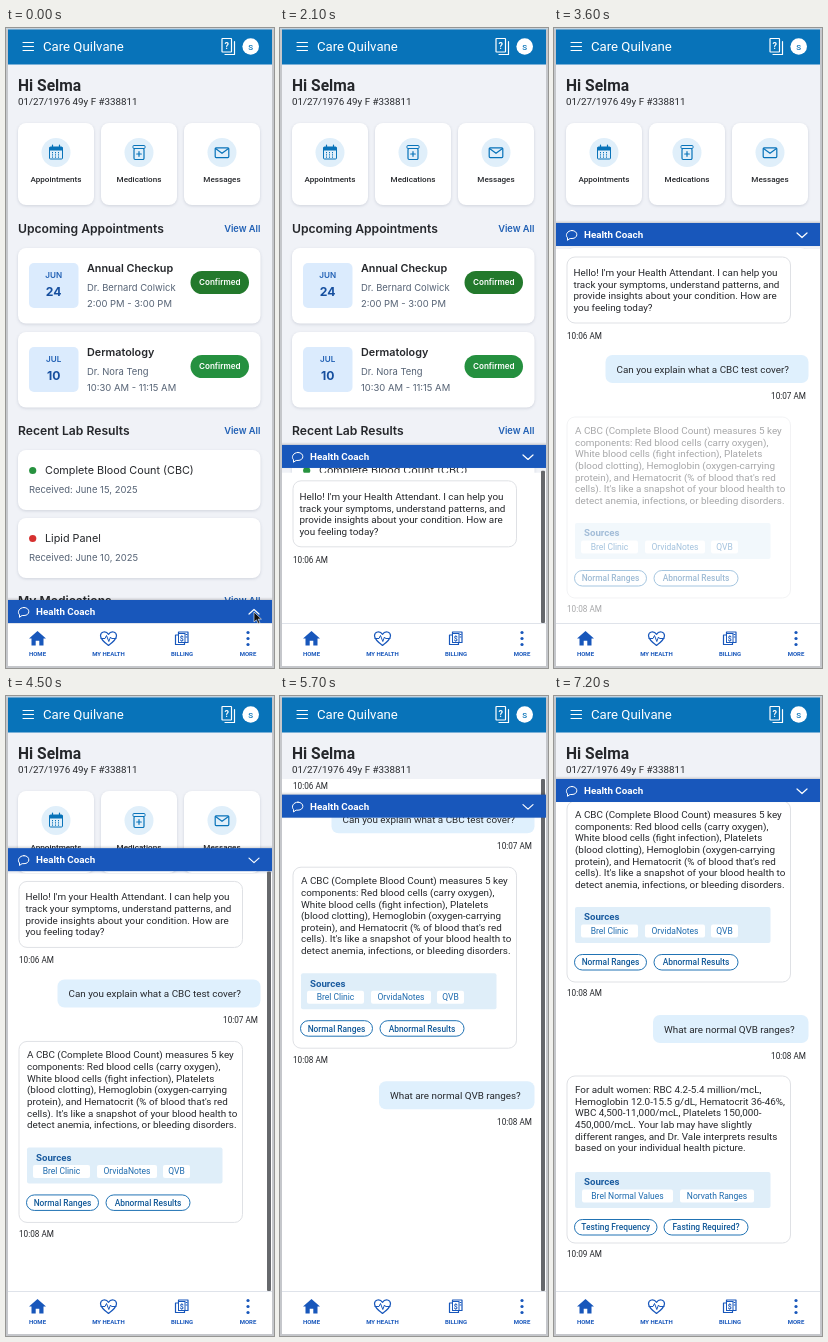
Write an HTML page that moves like this. It is 268 px wide and 640 px high and loops after 7300 ms.

```html
<!DOCTYPE html>
<html lang="en">
<head>
<meta charset="utf-8">
<title>Health chat</title>
<style>
html, body { margin: 0; width: 100%; height: 100%; overflow: hidden; background: #f0f2f7; }
svg { display: block; }
text { font-family: Roboto, sans-serif; fill: #25272b; white-space: pre; }
.inter { font-family: Inter, sans-serif; }
.card { fill: #fff; filter: drop-shadow(0 1px 1.5px #1b2a4a26); }
.line { fill: none; stroke-linecap: round; stroke-linejoin: round; }
</style>
</head>
<body>
<svg id="stage" width="268" height="640" viewBox="0 0 268 640"></svg>
<script>
const BLUE = '#1857bb', SKY = '#0873b9', LINK = '#1f5fb4', GREY = '#566375';

const rect = (x, y, w, h, fill, r = 0, extra = '') =>
  `<rect x="${x}" y="${y}" width="${w}" height="${h}" rx="${r}" fill="${fill}" ${extra}/>`;
const circle = (x, y, r, fill, extra = '') => `<circle cx="${x}" cy="${y}" r="${r}" fill="${fill}" ${extra}/>`;
const line = (d, color, width = 1, extra = '') =>
  `<path class="line" d="${d}" stroke="${color}" stroke-width="${width}" ${extra}/>`;
// y is the vertical middle of the capitals
const text = (x, y, str, size, { color = '#25272b', weight = 400, anchor = 'start', cls = '' } = {}) =>
  `<text x="${x}" y="${y + size * .36}" font-size="${size}" font-weight="${weight}" text-anchor="${anchor}" class="${cls}" style="fill:${color}">${str}</text>`;
const inter = (x, y, str, size, opts) => text(x, y, str, size, { cls: 'inter', ...opts });
const at = (x, y, body, id = '') => `<g ${id && `id="${id}"`} transform="translate(${x} ${y})">${body}</g>`;
const card = (x, y, w, h) => rect(x, y, w, h, '#fff', 8, 'class="card"');

const icons = {
  calendar: rect(-6.5, -5.5, 13, 12, 'none', 1, `stroke="${SKY}"`) + rect(-6.5, -5.5, 13, 3.5, SKY) +
    line('M-3.5-7.5v2M3.5-7.5v2', SKY, 1.2) +
    line('M-4 .2H5M-4 2.4H5M-4 4.6H5', SKY, 1.3, 'stroke-dasharray="1 2" style="stroke-linecap:butt"'),
  bottle: rect(-6, -7, 12, 3, 'none', .8, `stroke="${SKY}"`) + rect(-5, -4, 10, 11, 'none', 1.2, `stroke="${SKY}" stroke-width="1.2"`) +
    line('M-2.3 1.5h4.6M0-.8v4.6', SKY, 1.2),
  mail: rect(-6.8, -4.7, 13.6, 9.8, 'none', 1, `stroke="${SKY}" stroke-width="1.2"`) + line('M-6.5-4L0 .8L6.5-4', SKY, 1.2),
  home: `<path d="M0-7.5L8.5 0H6v7H1.8V2.3h-3.6V7H-6V0h-2.5Z" fill="${BLUE}"/>`,
  heart: line('M0 7C-5 3-8 .5-8-2.8C-8-7-2.5-8 0-4.2C2.5-8 8-7 8-2.8C8 .5 5 3 0 7Z', BLUE, 1.2) +
    line('M-7.5 0h4l1.5-3L.3 3L2-1.5L3 0h4.5', BLUE, 1),
  bill: line('M-3.5-3.5v-3h9.5v10.500h-3M-3.500-3.500h-3v9.500h9v-3', BLUE, 1.2) +
    rect(-3.5, -5, 6.5, 9, '#fff', 0, `stroke="${BLUE}"`) +
    text(-.2, -.5, '$', 7, { color: BLUE, weight: 700, anchor: 'middle' }) + line('M4-4h1M4-1.500h1', BLUE),
  dots: [-6, 0, 6].map(y => circle(0, y, 1.6, BLUE)).join(''),
};

function heading(y, title) {
  return inter(12, y, title, 12.15, { weight: 600 }) +
    inter(254.5, y, 'View All', 9.3, { color: LINK, weight: 600, anchor: 'end' });
}
function shortcut(x, w, icon, label) {
  const mid = x + w / 2;
  return card(x, 95, w, 82) + circle(mid, 124.500, 14.5, '#e0effa') + at(mid, 124.5, icons[icon]) +
    text(mid, 151, label, 8.1, { weight: 500, anchor: 'middle' });
}
function appointment(y, month, day, title, doctor, time, green) {
  return card(12, y, 242.500, 75.5) + rect(23, y + 15, 49.5, 45, '#dbebfd', 5) +
    inter(47.7, y + 27, month, 8.1, { color: LINK, weight: 600, anchor: 'middle' }) +
    inter(47.7, y + 44, day, 12.15, { color: '#164f9f', weight: 700, anchor: 'middle' }) +
    inter(81, y + 20, title, 10.8, { weight: 600 }) +
    inter(81, y + 40, doctor, 9.45, { color: GREY }) + inter(81, y + 55.5, time, 9.45, { color: GREY }) +
    rect(184.5, y + 23, 58.500, 23, green, 11.5) +
    inter(213.8, y + 34.5, 'Confirmed', 8.1, { color: '#fff', weight: 600, anchor: 'middle' });
}
function labResult(y, color, title, date) {
  return card(12, y, 242.5, 60) + circle(26.7, y + 20.5, 3.6, color) +
    inter(39, y + 20, title, 10.8) + inter(23, y + 40, 'Received: ' + date, 9.45, { color: GREY });
}

const paragraph = (x, y, lines) => lines.map((s, i) => text(x, y + i * 11.65, s, 9.87)).join('');
const stamp = (x, y, time, anchor) => text(x, y, time, 8.2, { anchor });
const bubble = (y, h) => rect(13, y, 223.5, h, '#fff', 8, 'stroke="#dfe1e5"');

function question(id, y, x, str, time) {
  return `<g id="${id}">` + rect(x, y, 254.5 - x, 28, '#dff0fd', 7) + text(x + 11, y + 14, str, 9.87) +
    stamp(252, y + 41, time, 'end') + '</g>';
}
// chips and buttons are [left, width, label]
function answer(id, y, h, lines, sourcesY, chips, buttons, time) {
  const top = y + sourcesY;
  return `<g id="${id}">` + bubble(y, h) + paragraph(21, y + 13.5, lines) +
    rect(21, top, 195.5, 36, '#dfeef9', 2) + text(30, top + 10, 'Sources', 9.7, { color: '#1a5b9f', weight: 600 }) +
    chips.map(([x, w, s]) => rect(x, top + 17.5, w, 13, '#fff', 2) +
      text(x + w / 2, top + 24, s, 8.5, { color: '#1c6aae', anchor: 'middle' })).join('') +
    buttons.map(([x, w, s]) => rect(x, top + 47.5, w, 15.5, '#fff', 7.8, 'stroke="#2173b4"') +
      text(x + w / 2, top + 55.3, s, 8.4, { color: '#135a99', weight: 500, anchor: 'middle' })).join('') +
    stamp(13, y + h + 11.5, time) + '</g>';
}

const page = rect(0, 0, 268, 640, '#f0f2f7') +
  text(12, 57.5, 'Hi Selma', 15.6, { weight: 700 }) + text(12, 73.5, '01/27/1976 49y F #338811', 9.8) +
  shortcut(12, 76, 'calendar', 'Appointments') + shortcut(95, 76, 'bottle', 'Medications') + shortcut(178, 76, 'mail', 'Messages') +
  heading(201, 'Upcoming Appointments') +
  appointment(220, 'JUN', '24', 'Annual Checkup', 'Dr. Bernard Colwick', '2:00 PM - 3:00 PM', '#23792c') +
  appointment(304, 'JUL', '10', 'Dermatology', 'Dr. Nora Teng', '10:30 AM - 11:15 AM', '#25903f') +
  heading(403, 'Recent Lab Results') +
  labResult(422, '#27923f', 'Complete Blood Count (CBC)', 'June 15, 2025') +
  labResult(490, '#d6302f', 'Lipid Panel', 'June 10, 2025') +
  heading(573, 'My Medications');

const chat = bubble(0, 66) +
  paragraph(19.5, 15.5, ["Hello! I'm your Health Attendant. I can help you", 'track your symptoms, understand patterns, and',
    'provide insights about your condition. How are', 'you feeling today?']) + stamp(13, 79, '10:06 AM') +
  question('ask1', 98, 51.5, 'Can you explain what a CBC test cover?', '10:07 AM') +
  answer('reply1', 160, 181, ['A CBC (Complete Blood Count) measures 5 key', 'components: Red blood cells (carry oxygen),',
    'White blood cells (fight infection), Platelets', '(blood clotting), Hemoglobin (oxygen-carrying',
    "protein), and Hematocrit (% of blood that's red", "cells). It's like a snapshot of your blood health to",
    'detect anemia, infections, or bleeding disorders.'], 106,
    [[27, 57, 'Brel Clinic'], [91, 60, 'OrvidaNotes'], [157, 27, 'QVB']],
    [[20.5, 72, 'Normal Ranges'], [100, 84, 'Abnormal Results']], '10:08 AM') +
  question('ask2', 374, 99, 'What are normal QVB ranges?', '10:08 AM') +
  answer('reply2', 435, 167, ['For adult women: RBC 4.2-5.4 million/mcL,', 'Hemoglobin 12.0-15.5 g/dL, Hematocrit 36-46%,',
    'WBC 4,500-11,000/mcL, Platelets 150,000-', '450,000/mcL. Your lab may have slightly',
    'different ranges, and Dr. Vale interprets results', 'based on your individual health picture.'], 96,
    [[28, 91, 'Brel Normal Values'], [126, 74, 'Norvath Ranges']],
    [[20.5, 82.5, 'Testing Frequency'], [110, 84, 'Fasting Required?']], '10:09 AM');

const coachBar = rect(0, 0, 268, 23, BLUE, 0, 'style="filter:drop-shadow(0 -1px 1px #0003)"') +
  line('M18 7.500c6.500 0 6.500 8 0 8c-1 0-1.500 0-2 0l-2.500 1.800v-2.500c-2.500-2.500-.5-7.300 4.500-7.300Z', '#fff') +
  text(30, 11.7, 'Health Coach', 9.8, { color: '#fff', weight: 700 }) +
  circle(248, 12, 8.5, '#8fa0bd', 'id="press" stroke="#b9c5d8" stroke-width=".7"') +
  line('M243 14l5-4.500l5 4.500', '#fff', 1.2, 'id="chevron"');

const topBar = rect(0, 0, 268, 36.5, SKY) + line('M17 14.500h10.500M17 18.500h10.500M17 22.500h10.500', '#fff', 1.1) +
  text(37, 18.5, 'Care Quilvane', 13.2, { color: '#fff' }) +
  rect(216, 10.500, 9.5, 13.500, 'none', .5, 'stroke="#fff" stroke-width="1.2"') + line('M219 26.500h9.500v-13', '#fff', 1.2) +
  text(220.8, 17.3, '?', 9, { color: '#fff', weight: 700, anchor: 'middle' }) +
  circle(244.7, 18.5, 8.3, '#fff') + text(244.7, 18.7, 'S', 8, { color: SKY, weight: 500, anchor: 'middle' });

const navBar = rect(0, 595, 268, 45, '#fff') + line('M0 595.500H268', '#dfe3ea') +
  [[31.5, 'home', 'HOME'], [102.5, 'heart', 'MY HEALTH'], [176, 'bill', 'BILLING'], [242, 'dots', 'MORE']].map(([x, icon, label]) =>
    at(x, 610.5, icons[icon]) + text(x, 626, label, 6, { color: BLUE, weight: 700, anchor: 'middle' })).join('');

document.getElementById('stage').innerHTML =
  '<clipPath id="clip"><rect id="window" width="268" height="640"/></clipPath>' + page +
  '<g clip-path="url(#clip)">' + rect(0, 0, 268, 640, '#fff') + at(0, 0, chat, 'chat') + '</g>' +
  rect(261, 0, 4, 0, '#66686c', 1, 'id="scrollbar"') + at(0, 0, coachBar, 'bar') + topBar + navBar +
  '<path d="M1 0V639H267V0" fill="none" stroke="#c5c7cb" stroke-width="2"/>' + rect(0, 0, 268, 1.5, '#c5d3df') +
  '<path id="cursor" d="M248 584v10l2.400-2.200l1.700 3.700l1.800-.8l-1.700-3.600h3.200Z" fill="#111" stroke="#fff" stroke-width=".6"/>';

const el = id => document.getElementById(id);
const ramp = (t, start, length) => Math.min(1, Math.max(0, (t - start) / length));
const smooth = x => x * x * (3 - 2 * x);
const show = (id, on) => el(id).setAttribute('opacity', +on);
const moveY = (id, y) => el(id).setAttribute('transform', `translate(0 ${y})`);

// [start, length, bar travel, chat travel]
const slides = [[1400, 800, -162, -159], [2900, 500, -215, -217], [4100, 610, -59, -60], [5300, 625, -53, -224]];

function draw(now) {
  const t = Math.floor(now % 7300 / 100) * 100;
  let barY = 572, chatY = 605;
  for (const [start, length, barStep, chatStep] of slides) {
    const p = smooth(ramp(t, start, length));
    barY += barStep * p;
    chatY += chatStep * p;
  }
  moveY('bar', barY);
  moveY('chat', chatY);
  el('window').setAttribute('y', Math.max(83, chatY - 8));
  const scrollTop = Math.min(595, Math.max(83, chatY - 10));
  el('scrollbar').setAttribute('y', scrollTop);
  el('scrollbar').setAttribute('height', 595 - scrollTop);
  show('scrollbar', t >= 1500 && t < 3300 || t >= 4100 && t < 6000);
  show('ask1', ramp(t, 2400, 300));
  show('reply1', ramp(t, 3400, 500));
  show('ask2', ramp(t, 4700, 300));
  show('reply2', ramp(t, 6000, 500));
  show('cursor', t < 500);
  show('press', t >= 500 && t < 1400);
  el('chevron').setAttribute('transform', t < 1400 ? '' : 'rotate(180 248 12)');
  requestAnimationFrame(draw);
}
requestAnimationFrame(draw);
</script>
</body>
</html>
```
